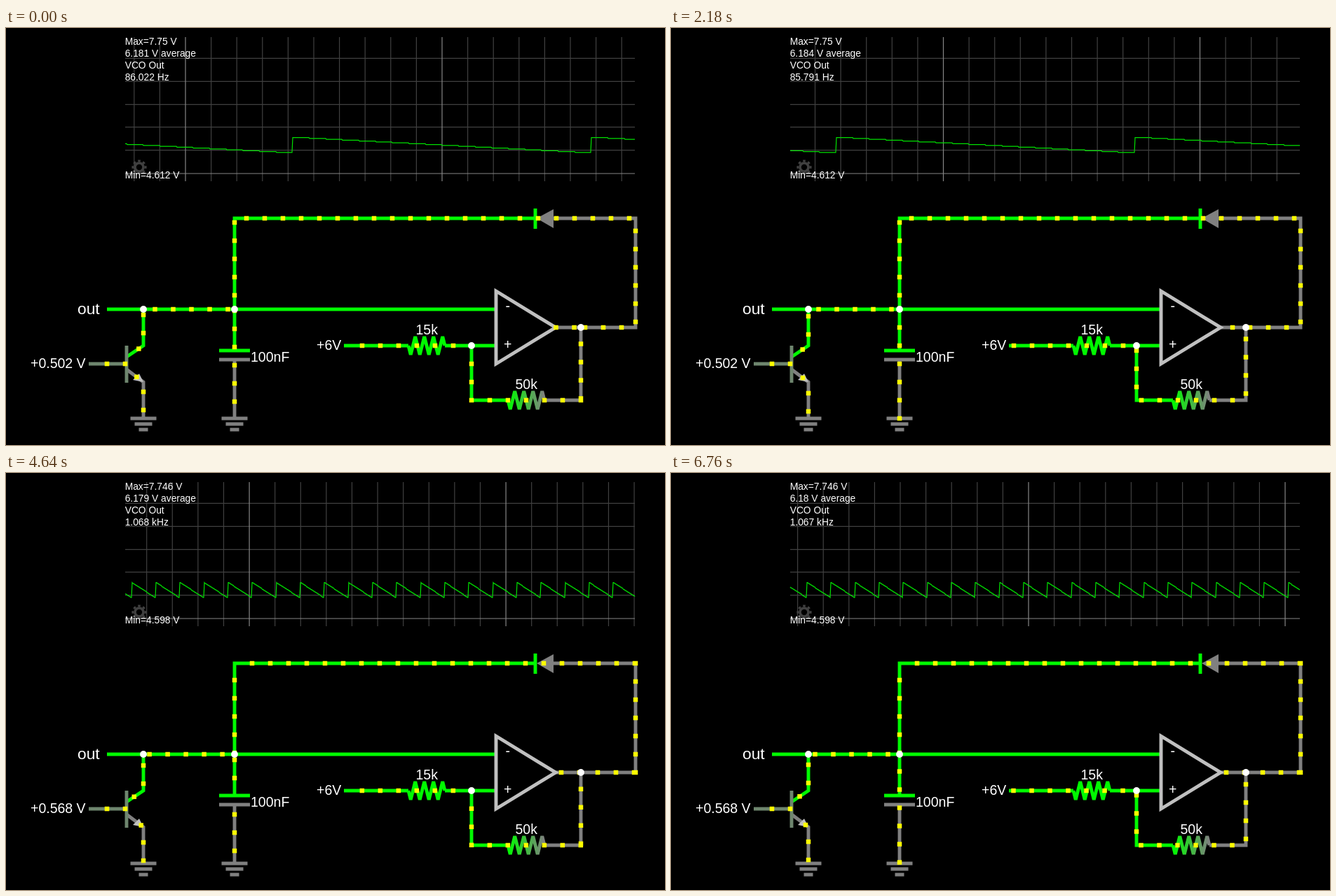
An HTML page for the animation above (6830 ms loop, 940x596 px).

```html
<!DOCTYPE html>
<html lang="en">
<head>
<meta charset="utf-8">
<title>Voltage-controlled oscillator</title>
<style>
  html, body { margin: 0; width: 100%; height: 100%; overflow: hidden; background: #000; }
  svg { display: block; width: 940px; height: 596px; }
  text { font-family: "Liberation Sans", Arial, sans-serif; font-size: 19.5px; fill: #fff; }
  .scope text { font-size: 13.8px; }
  .scope path { fill: none; stroke-width: 1.2; }
  .wire { fill: none; stroke-width: 4.9; }
  .live { stroke: #00fa00; }
  .dead { stroke: #808080; }
  .base { stroke: #6e866e; }
</style>
</head>
<body>
<svg viewBox="0 0 940 596">
  <defs>
    <linearGradient id="fade" gradientUnits="userSpaceOnUse" x1="716" y1="0" x2="768" y2="0">
      <stop stop-color="#00fa00"/><stop offset="1" stop-color="#808080"/>
    </linearGradient>
  </defs>

  <g class="scope">
    <path id="minor" stroke="#404040"/>
    <path stroke="#404040" d="M170 43.3H897M170 76.3H897M170 109.3H897M170 141.7H897M170 174.7H897"/>
    <path id="major" stroke="#858585"/>
    <path stroke="#858585" d="M170 208H897"/>
    <g fill="none" stroke="#404040">
      <circle cx="190" cy="199" r="6" stroke-width="3.6"/>
      <circle cx="190" cy="199" r="9" stroke-width="3.2" pathLength="16" stroke-dasharray="1" stroke-dashoffset=".5"/>
    </g>
    <path id="trace" stroke="#00e000"/>
    <text id="max" x="169.7" y="24"/>
    <text id="avg" x="169.7" y="41"/>
    <text x="169.7" y="58.3">VCO Out</text>
    <text id="freq" x="169.7" y="75"/>
    <text id="min" x="169.7" y="215"/>
  </g>

  <g class="wire">
    <g class="dead">
      <path d="M781 272H898V428H784M820 428V532H768M326 474V558M196 558V506L172 488M304 474H348"/>
      <path id="grounds"/>
      <path d="M781 259L757 272L781 286Z" fill="#808080" stroke="none"/>
    </g>
    <path class="live" d="M144 402H697M326 461V272H755M755 258V287M304 461H348M196 402V454L172 470M482 454H574M626 454H697M664 454V532H716"/>
    <path class="live" id="r15"/>
    <path id="r50" stroke="url(#fade)"/>
    <path class="base" d="M118 480H172M172 454V507"/>
    <path d="M196 506L190 494L181 503Z" fill="#c0c0c0"/>
    <path d="M699 376L784 428L699 480Z" stroke="#c0c0c0"/>
  </g>
  <path id="dots" fill="#ff0"/>
  <g fill="#fff">
    <circle cx="196" cy="402" r="4.9"/><circle cx="326" cy="402" r="4.9"/>
    <circle cx="664" cy="454" r="4.9"/><circle cx="820" cy="428" r="4.9"/>
  </g>

  <text x="102" y="409" style="font-size:22.75px">out</text>
  <text id="volts" x="35" y="486"/>
  <text x="349" y="477">100nF</text>
  <text x="443" y="460">+6V</text>
  <text x="584.5" y="438">15k</text>
  <text x="726.5" y="516">50k</text>
  <text x="712.5" y="404">-</text>
  <text x="710" y="459">+</text>
</svg>

<script>
const LOOP = 6830, STEP = 68.4, GAP = 26, PITCH = 36.6;
const LEFT = 170, RIGHT = 897;
const $ = id => document.getElementById(id);
const mod = (a, b) => ((a % b) + b) % b;

// Three control voltages; the lists hold values at the steps in keys.
const clips = [
  { end: 33, keys: [0, 19, 32], volts: "0.502", max: "7.75", min: "4.612",
    period: 426, edge: 409, bright: 256, shift: [0, 351.5, 599.5],
    drain: [8, 8.5, 10], cap: [430, 428, 428], feed: [0, 4.5, 7], amp: [9.5, 17, 19],
    loop: 7, turn: 20, reads: [["6.181", "86.022 Hz"], ["6.184", "85.791 Hz"]] },
  { end: 66, keys: [43, 58], volts: "0.531", max: "7.77", min: "4.593",
    period: 138.8, edge: 230, bright: 257, shift: [0, 284],
    drain: [25.5, 29], cap: [417.5, 413.5], feed: [4.5, 10], amp: [11, 13],
    loop: 12, turn: 51, reads: [["6.185", "263.374 Hz"], ["6.178", "263.918 Hz"]] },
  { end: 100, keys: [78, 99], volts: "0.568", max: "7.746", min: "4.598",
    period: 34.33, edge: 201.5, bright: 529.5, shift: [0, 385.5],
    drain: [24, 41], cap: [424.5, 400.5], feed: [2, 6.5], amp: [28, 28],
    loop: 25, turn: 89, reads: [["6.179", "1.068 kHz"], ["6.18", "1.067 kHz"]] }
];

function zigzag(x, y) {
  let d = `M${x} ${y}`;
  for (let i = 0; i < 8; i++) d += `L${x + 3.25 + 6.5 * i} ${y + (i % 2 ? -13 : 13)}`;
  return d + `L${x + 52} ${y}`;
}

const ground = x => [18.5, 12.5, 6.5].map((w, i) => `M${x - w} ${558 + 8 * i}h${2 * w}`).join("");

// Linear between keys, carried on past both ends.
function lerp(keys, vals, n) {
  let i = 1;
  while (i < keys.length - 1 && n > keys[i]) i++;
  return vals[i - 1] + (vals[i] - vals[i - 1]) * (n - keys[i - 1]) / (keys[i] - keys[i - 1]);
}

// Evenly spaced charge markers along a polyline.
function flow(phase, ...pts) {
  let d = "", next = mod(phase, GAP);
  for (let i = 2; i < pts.length; i += 2) {
    const [x0, y0, x1, y1] = pts.slice(i - 2, i + 2);
    const len = Math.hypot(x1 - x0, y1 - y0);
    for (; next <= len; next += GAP) {
      const k = next / len;
      d += `M${x0 + (x1 - x0) * k - 3.25} ${y0 + (y1 - y0) * k - 3.25}h6.5v6.5h-6.5z`;
    }
    next -= len;
  }
  return d;
}

function drawScope(clip, shift, n) {
  const lines = { minor: "", major: "" };
  const start = clip.bright - shift;
  for (let k = Math.ceil((LEFT - 1 - start) / PITCH); start + k * PITCH <= RIGHT; k++)
    lines[mod(k, 10) ? "minor" : "major"] += `M${start + k * PITCH} 13V219`;
  $("minor").setAttribute("d", lines.minor);
  $("major").setAttribute("d", lines.major);

  const edge = clip.edge - shift, pts = [];
  for (let x = LEFT; x <= RIGHT; x++) {
    const u = mod(x - edge, clip.period) / clip.period;
    pts.push(`${x} ${(156.6 + 21.3 * Math.floor(u * 18) / 17).toFixed(2)}`);
  }
  $("trace").setAttribute("d", "M" + pts.join("L"));

  const [avg, freq] = clip.reads[n < clip.turn ? 0 : 1];
  const first = LEFT + mod(edge - LEFT, clip.period);
  $("max").textContent = `Max=${clip.max} V`;
  $("min").textContent = `Min=${clip.min} V`;
  $("avg").textContent = `${avg} V average`;
  $("freq").textContent = first + clip.period <= RIGHT ? freq : "";
  $("volts").textContent = `+${clip.volts} V`;
}

function drawDots(clip, value) {
  const drain = value("drain"), cap = value("cap"), feed = value("feed"), loop = clip.loop;
  $("dots").setAttribute("d", [
    flow(loop - 1, 820, 428, 898, 428),
    flow(loop + 1, 898, 428, 898, 272),
    flow(loop + 2, 898, 272, 326, 272),
    flow(loop - 1, 326, 272, 326, 402),
    flow(drain + 1.5, 326, 402, 196, 402),
    flow(drain, 196, 402, 196, 454, 172, 470),
    flow(drain + 10, 172, 488, 196, 506, 196, 558),
    flow(25, 119, 480, 172, 480),
    flow(461 - cap, 326, 461, 326, 402),
    flow(558 - cap, 326, 558, 326, 474),
    flow(feed - 2, 484, 454, 664, 454),
    flow(feed, 664, 454, 664, 532),
    flow(feed, 664, 532, 820, 532),
    flow(feed + 2.5, 820, 532, 820, 428),
    flow(value("amp"), 820, 428, 784, 428)
  ].join(""));
}

let shown = -1;
function tick() {
  const n = Math.min(99, Math.floor((performance.now() % LOOP) / STEP + 0.2));
  if (n !== shown) {
    shown = n;
    const clip = clips.find(c => n < c.end);
    const value = name => lerp(clip.keys, clip[name], n);
    drawScope(clip, value("shift"), n);
    drawDots(clip, value);
  }
  requestAnimationFrame(tick);
}

$("r15").setAttribute("d", zigzag(574, 454));
$("r50").setAttribute("d", zigzag(716, 532));
$("grounds").setAttribute("d", ground(196) + ground(326));
tick();
</script>
</body>
</html>
```
